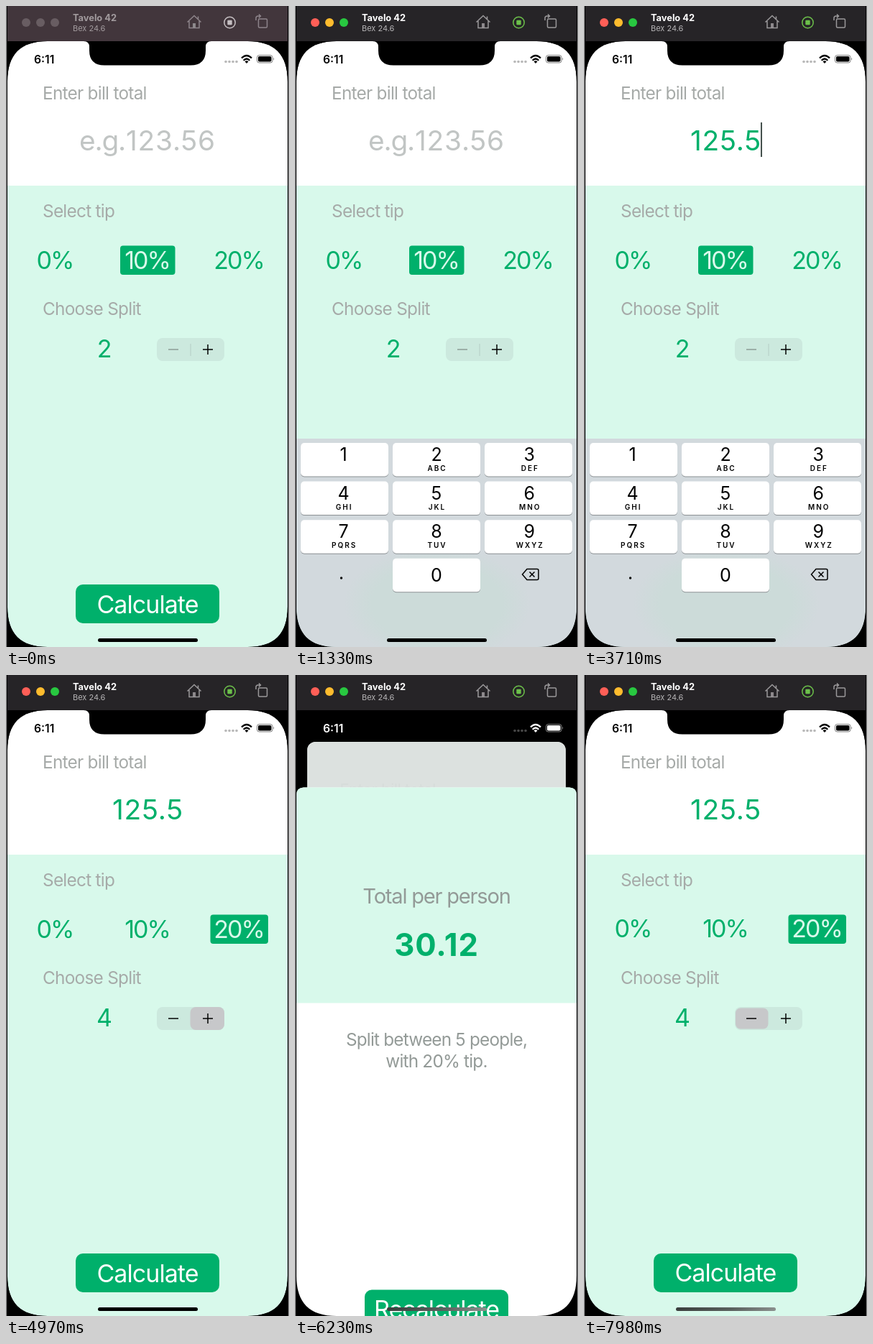
Animation of 394x892 px, one loop 8 s. Source, as an HTML page:

```html
<!DOCTYPE html>
<html lang="en">
<head>
<meta charset="utf-8">
<title>Bill splitter</title>
<style>
html, body { margin: 0; width: 100%; height: 100%; overflow: hidden; background: #111; }
svg { display: block; width: 394px; height: 892px; }
text { font-family: Inter, Roboto, "Liberation Sans", sans-serif; font-optical-sizing: none; letter-spacing: -.032em; }
.mid { text-anchor: middle; }
.label { font-size: 24.3px; fill: #a6aaa8; letter-spacing: -.029em; }
.note { font-size: 24.3px; fill: #939a97; }
.big { font-size: 34px; }
.bill { font-size: 38.8px; word-spacing: -.22em; }
.num { letter-spacing: .02em; }
.tip text { letter-spacing: -.058em; }
.green { fill: #00b06b; }
.mint { fill: #d8f9eb; }
.white { fill: #fff; }
.key { fill: #fff; }
.key.down { fill: #b3bdc3; }
.digit { font-size: 25px; letter-spacing: 0; }
.abc { font-size: 10px; font-weight: 600; letter-spacing: 2px; }
.line { fill: none; stroke-width: 1.5; }
</style>
</head>
<body>
<svg viewBox="0 0 394 892">
  <defs>
    <clipPath id="screen"><path id="screenShape"/></clipPath>
    <clipPath id="cardClip"><path id="cardShape"/></clipPath>
    <linearGradient id="greyBar">
      <stop offset="0" stop-color="#3a3f3d"/>
      <stop offset=".55" stop-color="#59605d"/>
      <stop offset="1" stop-color="#8a908d"/>
    </linearGradient>
    <radialGradient id="glow">
      <stop offset=".7" stop-color="#ccdbd9"/>
      <stop offset="1" stop-color="#ccdbd9" stop-opacity="0"/>
    </radialGradient>
  </defs>

  <rect width="394" height="892" fill="#8a8a8c"/>
  <rect x="1" width="392" height="892" fill="#000"/>

  <!-- window title bar -->
  <rect id="bar" x="2" width="390" height="49"/>
  <g id="lights">
    <circle cx="28" cy="23" r="6"/><circle cx="48" cy="23" r="6"/><circle cx="68" cy="23" r="6"/>
  </g>
  <text id="device" x="93" y="21" font-size="12.8" font-weight="700" style="letter-spacing:0">Tavelo 42</text>
  <text id="system" x="93" y="35" font-size="11" style="letter-spacing:0">Bex 24.6</text>
  <g id="icons" class="line">
    <path d="M252.500 22.500L262 13.500L271.500 22.500M255 21V30.500H269V21M267.500 18V14.500"/>
    <rect x="260" y="24" width="4" height="6" fill="#8d898c" stroke="none"/>
    <rect x="351.500" y="18" width="12" height="12" rx="1.500"/>
    <path d="M348 20V17Q348 14 351 14H354M352 11.500L354.500 14L352 16.500"/>
  </g>
  <g id="stop">
    <circle class="line" cx="311.500" cy="23" r="7.700"/>
    <rect x="308.300" y="19.800" width="6.400" height="6.400" rx="1" stroke="none"/>
  </g>

  <g clip-path="url(#screen)">
    <g id="card"><g clip-path="url(#cardClip)">
      <rect class="white" x="2" y="49" width="390" height="202"/>
      <rect class="mint" x="2" y="250" width="390" height="642"/>
      <text class="label" x="51" y="130">Enter bill total</text>
      <text class="label" x="51" y="294">Select tip</text>
      <text class="label" x="51" y="430">Choose Split</text>
      <text id="hint" class="bill mid" x="197" y="201" fill="#c1c5c4">e.g. <tspan class="num">123.56</tspan></text>
      <text id="bill" class="bill num mid green" x="197.500" y="201"></text>
      <rect id="caret" y="162" width="2" height="48" fill="#44504c"/>
      <rect id="pick" class="green" y="333.500" height="40.500" rx="4"/>
      <g id="tips" class="big mid tip">
        <text x="68" y="365.500">0%</text><text x="196.500" y="365.500">10%</text><text x="324" y="365.500">20%</text>
      </g>
      <text id="count" class="big mid green" x="136.500" y="489"></text>
      <rect x="210" y="462" width="94" height="32" rx="8" fill="#cce9de"/>
      <rect id="divider" x="256.500" y="470" width="1" height="17" fill="#b4cdc3"/>
      <rect id="less" x="211" y="463.500" width="45.500" height="29" rx="7" fill="#c7c8ca"/>
      <rect id="more" x="256.500" y="462" width="47.500" height="32" rx="8" fill="#c7c8ca"/>
      <path id="minus" class="line" d="M226 478H240"/>
      <path class="line" stroke="#000" d="M274 478H288M281 471V485"/>
      <rect class="green" x="97" y="805" width="200" height="54" rx="10"/>
      <text id="calc" class="big mid white" x="197" y="844.500" style="letter-spacing:-.028em">Calculate</text>
      <rect id="dim" x="2" y="49" width="390" height="843" fill="#dadfdd"/>
    </g></g>

    <path d="M108 49Q116 49 116 57V62Q116 82.500 137 82.500H257Q278 82.500 278 62V57Q278 49 286 49Z"/>
    <g id="status">
      <text x="39" y="79.500" font-size="15.700" font-weight="600" style="letter-spacing:0">6:11</text>
      <g opacity=".28"><circle cx="306" cy="77.500" r="1.800"/><circle cx="311" cy="77.500" r="1.800"/><circle cx="316" cy="77.500" r="1.800"/><circle cx="321" cy="77.500" r="1.800"/></g>
      <path class="line" stroke="currentColor" style="stroke-width:2.300" d="M328 72.500Q335 65.500 342 72.500M330.700 75.700Q335 71.300 339.300 75.700"/>
      <path d="M332.500 77.300Q335 75 337.500 77.300L335 80Z"/>
      <rect class="line" stroke="currentColor" x="349.500" y="68.500" width="21.500" height="10.500" rx="3" style="stroke-width:1" opacity=".5"/>
      <rect x="351" y="70" width="18.500" height="7.500" rx="1.800"/>
      <path d="M372.300 72Q374.300 73.700 372.300 75.500Z" opacity=".5"/>
    </g>

    <g id="sheet">
      <rect class="white" x="2" y="106" width="390" height="800" rx="10"/>
      <path class="mint" d="M2 406V116Q2 106 12 106H382Q392 106 392 116V406Z"/>
      <text class="note mid" x="197" y="267" style="font-size:29.100px;letter-spacing:-.042em">Total per person</text>
      <text class="num mid green" x="197" y="340" font-size="43.600" font-weight="700">30.12</text>
      <text class="note mid" x="197" y="465">Split between 5 people,</text>
      <text class="note mid" x="197" y="495">with 20% tip.</text>
      <rect class="green" x="97" y="805" width="200" height="54" rx="10"/>
      <text id="recalc" class="big mid white" x="197" y="844.500">Recalculate</text>
    </g>

    <g id="pad">
      <rect x="2" y="602" width="390" height="292" fill="#d2d9dd"/>
      <ellipse cx="198" cy="832" rx="130" ry="80" fill="url(#glow)"/>
      <g id="keys"></g>
      <circle cx="64.500" cy="796" r="1.700"/>
      <path class="line" stroke="#000" d="M323 783.500H337Q339 783.500 339 785.500V796.500Q339 798.500 337 798.500H323L316.500 791ZM326.500 787.500L333.500 794.500M333.500 787.500L326.500 794.500"/>
    </g>
    <rect id="home" x="128" y="880" width="139" height="5" rx="2.500"/>
  </g>
</svg>
<script>
const LOOP = 8000, TICK = 70;
const $ = id => document.getElementById(id);
const set = (id, attrs) => { for (const k in attrs) $(id).setAttribute(k, attrs[k]); };

// Last value whose start time has been reached; steps are [time, value].
const at = (t, steps) => steps.reduce((v, [start, next]) => t >= start ? next : v, steps[0][1]);
const during = (t, from, to) => t >= from && t < to;

// Critically damped spring from 0 to 1.
const spring = (t, start) => {
  const x = Math.max(0, t - start) * .01826;
  return 1 - (1 + x) * Math.exp(-x);
};

// Screen outline with continuous corners that reach r along each side.
const outline = r => {
  const h = r * .676, v = r - h;
  return `M2 ${49 + r}c0 ${-h} ${v} ${-r} ${r} ${-r}H${392 - r}c${h} 0 ${r} ${v} ${r} ${r}`
    + `V${892 - r}c0 ${h} ${-v} ${r} ${-r} ${r}H${2 + r}c${-h} 0 ${-r} ${-v} ${-r} ${-r}Z`;
};
set('screenShape', { d: outline(56) });

const letters = ['', 'ABC', 'DEF', 'GHI', 'JKL', 'MNO', 'PQRS', 'TUV', 'WXYZ'];
const keyMarkup = (n, col, row, abc) => {
  const x = 8 + 128 * col, y = 608 + 53.6 * row, cx = 67.7 + 129.3 * col;
  return `<rect x="${x}" y="${y + 1}" width="122" height="46.500" rx="5" fill="#8c9194"/>
    <rect id="key${n}" class="key" x="${x}" y="${y}" width="122" height="46.500" rx="5"/>
    <text class="digit mid" x="${cx}" y="${y + (n ? 25 : 32)}">${n}</text>
    <text class="abc mid" x="${cx + 1}" y="${y + 39}">${abc}</text>`;
};
$('keys').innerHTML = letters.map((abc, i) => keyMarkup(i + 1, i % 3, Math.floor(i / 3), abc)).join('')
  + keyMarkup(0, 1, 3, '');

const typed = [[0, ''], [1750, '1'], [2030, '12'], [2450, '125'], [2870, '125.'], [3360, '125.5']];
const pressed = [[0, ''], [1610, '1'], [1750, ''], [1890, '2'], [2100, ''], [2310, '5'], [2520, ''], [3290, '5'], [3360, '']];
const people = [[0, 2], [4760, 3], [4970, 4], [5110, 5], [7910, 4]];
const plusGlow = [[0, 0], [4760, 1], [4900, 0], [4970, 1], [5250, .5], [5320, 0]];
const caretGlow = [[0, 0], [630, 1], [1190, .6], [1260, .2], [1330, 0], [1610, 1], [3850, 0]];

function drawWindow(t) {
  const active = t >= 280;
  const colors = active ? ['#ff5f57', '#febc2e', '#28c840'] : ['#685d62', '#685d62', '#685d62'];
  set('bar', { fill: active ? '#262427' : '#42363c' });
  [...$('lights').children].forEach((c, i) => c.setAttribute('fill', colors[i]));
  set('device', { fill: active ? '#fff' : '#a29b9e' });
  set('system', { fill: active ? '#b5b3b5' : '#a29b9e' });
  set('icons', { stroke: active ? '#9a989a' : '#8d848a' });
  const stop = active ? '#6cc04a' : '#c5bfc2';
  set('stop', { fill: stop, stroke: stop });
}

function drawForm(t) {
  const text = at(t, typed), field = $(text ? 'bill' : 'hint');
  $('bill').textContent = text;
  set('hint', { opacity: text ? 0 : 1 });
  const half = field.getComputedTextLength() / 2;
  set('caret', { x: text ? 196.5 + half : 196 - half, opacity: at(t, caretGlow) });

  const tip = t < 3850 ? 1 : 2;
  set('pick', tip === 1 ? { x: 159, width: 76.5 } : { x: 284.5, width: 80.5 });
  [...$('tips').children].forEach((e, i) => {
    e.setAttribute('fill', i === tip ? '#d8f9eb' : '#00b06b');
    e.setAttribute('opacity', i === 2 && during(t, 3780, 3850) ? .4 : 1);
  });

  const n = at(t, people), plus = at(t, plusGlow), minus = t >= 7910 ? 1 : 0;
  $('count').textContent = n;
  set('more', { opacity: plus });
  set('less', { opacity: minus });
  set('divider', { opacity: 1 - Math.max(plus, minus) });
  set('minus', { stroke: n > 2 ? '#000' : '#8c9c96' });
  set('calc', { opacity: during(t, 5740, 5950) ? .2 : 1 });
}

function drawPad(t) {
  const up = spring(t, 640) - spring(t, 3870);
  set('pad', { transform: `translate(0 ${290 * (1 - up)})` });
  const down = at(t, pressed);
  for (let i = 0; i < 10; i++) $('key' + i).classList.toggle('down', down === String(i));
}

function drawSheet(t) {
  const p = spring(t, 5987) - spring(t, 7045);
  set('sheet', { transform: `translate(0 ${786 * (1 - p)})` });
  set('card', { transform: `translate(197 ${49 + 47 * p}) scale(${1 - .082 * p}) translate(-197 -49)` });
  set('cardShape', { d: outline(56 - 44 * p) });
  set('dim', { opacity: p });
  set('recalc', { opacity: during(t, 6930, 7070) ? .16 : 1 });
  const ink = p > .4 ? '#fff' : '#000';
  set('status', { fill: ink, color: ink });
  set('home', { fill: t < 5950 ? '#000' : 'url(#greyBar)' });
}

function draw(now) {
  const t = Math.floor(now % LOOP / TICK) * TICK;
  drawWindow(t);
  drawForm(t);
  drawPad(t);
  drawSheet(t);
}

const begin = performance.now();
function loop() {
  draw(performance.now() - begin);
  requestAnimationFrame(loop);
}
loop();
</script>
</body>
</html>
```
